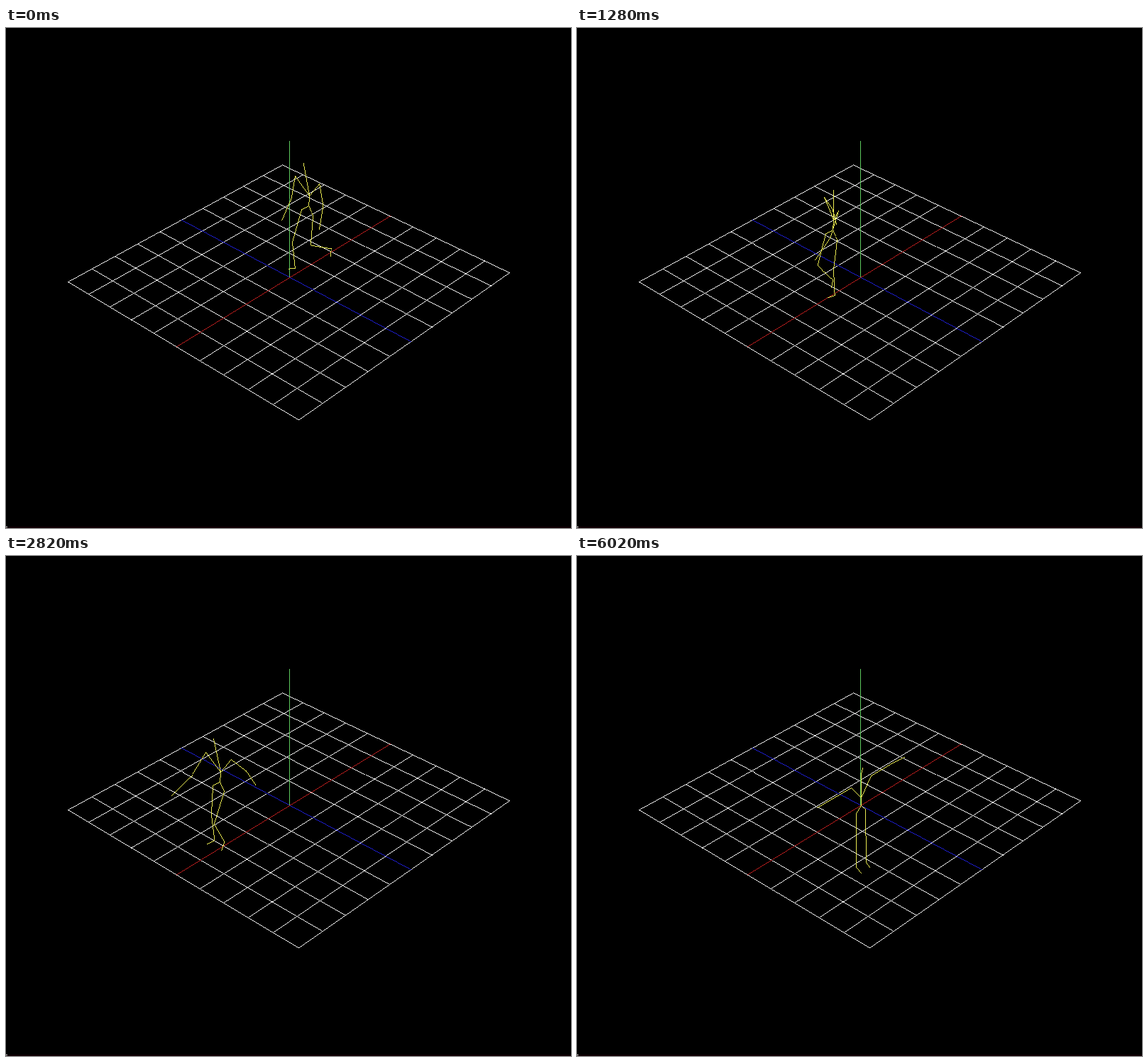
An HTML page with a canvas for the animation above (6.62 s loop, 796 by 704 pixels).

```html
<!DOCTYPE html>
<html lang="en">
<head>
<meta charset="utf-8">
<title>Walking skeleton</title>
<style>
html, body { margin: 0; width: 100%; height: 100%; overflow: hidden; background: #000; }
canvas { display: block; }
</style>
</head>
<body>
<canvas id="stage" width="796" height="704"></canvas>
<script>
const ctx = document.getElementById('stage').getContext('2d');
const LOOP = 6620, HOLD = 54, REST = 71, STRIDE = 46.5;
const RAD = Math.PI / 180;

// Hard-edged line, one pixel wide
function line([x0, y0], [x1, y1]) {
  const n = Math.max(1, Math.round(Math.max(Math.abs(x1 - x0), Math.abs(y1 - y0))));
  for (let i = 0; i <= n; i++) {
    ctx.fillRect(Math.round(x0 + (x1 - x0) * i / n), Math.round(y0 + (y1 - y0) * i / n), 1, 1);
  }
}

function path(color, ...points) {
  ctx.fillStyle = color;
  for (let i = 1; i < points.length; i++) line(points[i - 1], points[i]);
}

// Perspective view of the floor, a and b from -1 to 1
function floor(a, b) {
  const x = 149.85 * a + 161.15 * b, z = 149.85 * b - 161.15 * a;
  const w = 1 - 0.119 * z / 311;
  return [399.4 + x / w, 350.6 + 0.569 * z / w];
}

function drawScene() {
  ctx.fillStyle = '#000';
  ctx.fillRect(0, 0, 796, 704);
  ctx.fillStyle = '#100004';
  ctx.fillRect(0, 702, 796, 2);
  ctx.fillStyle = '#ececec';
  ctx.fillRect(0, 702, 2, 1);
  for (let i = -5; i <= 5; i++) {
    if (!i) continue;
    path('#ececec', floor(i / 5, -1), floor(i / 5, 1));
    path('#ececec', floor(-1, i / 5), floor(1, i / 5));
  }
  path('#b41c1c', floor(-1, 0), floor(1, 0));
  path('#1c1cc8', floor(0, -1), floor(0, 1));
  path('#5cc85c', [399, 159], [399, 350]);
}

const YELLOW = '#e8e850';

function drawWalker(step) {
  const phase = 360 * (step - 42) / STRIDE;
  const wave = (deg, shift, times = 1) => Math.cos((deg * times - shift) * RAD);
  const x = 428.5 - 2.36 * step, y = 248.5 + 1.36 * step + 4 * wave(phase, 0, 2);

  // Forward, sideways and up from the pelvis, to the screen
  const put = (f, s, u) => [x - f + s, y + 0.6 * f + 0.53 * s - u];
  const pelvis = put(0, 0, 0), neck = put(-1, 0, 13.4);
  path(YELLOW, put(4, -5 * wave(phase, 90), 61), neck, pelvis);

  // Bones given as [length, angle from straight down, sideways place]
  function limb(from, f, s, u, bones) {
    const points = [from, put(f, s, u)];
    for (const [length, angle, out] of bones) {
      f += length * Math.sin(angle * RAD);
      u -= length * Math.cos(angle * RAD);
      points.push(put(f, out, u));
    }
    path(YELLOW, ...points);
  }

  // Both sides move alike, half a stride apart.
  for (const side of [-1, 1]) {
    const p = phase + (side > 0 ? 180 : 0);
    const swing = wave(p, 105), snap = wave(p, -51, 3);
    limb(neck, 2 + 4 * wave(p, 80), 14 * side, 38, [
      [31, 28 * swing + 9 * snap, 17 * side],
      [28, 20 + 35 * swing + 12 * snap, 19 * side]
    ]);
    limb(pelvis, 2, 8 * side, -8, [
      [40, 12 + 19 * wave(p, -25), 8 * side],
      [38, -20 + 25 * wave(p, 25) + 9 * wave(p, 240, 2), 7 * side],
      [10, 60 + 55 * wave(p, 45), 7 * side]
    ]);
  }
}

function drawRest() {
  const neck = [400, 340], pelvis = [400, 351];
  path(YELLOW, [402, 298], [400, 306], neck, pelvis);
  path(YELLOW, [338, 354], [386, 326], neck, [414, 309], [446, 290], [461, 283]);
  path(YELLOW, [400, 446], [393, 438], [393, 362], pelvis, [406, 356], [407, 431], [412, 438]);
}

// Steps last 20, 20 and 100 ms in turn.
function stepAt(ms) {
  const t = ms + 20, r = t % 140;
  return 3 * Math.floor(t / 140) + (r < 20 ? 0 : r < 40 ? 1 : 2);
}

let shown = -1;
function tick(now) {
  const step = stepAt(now % LOOP);
  if (step !== shown) {
    shown = step;
    drawScene();
    if (step < REST) drawWalker(Math.min(step, HOLD));
    else drawRest();
  }
  requestAnimationFrame(tick);
}
tick(0);
</script>
</body>
</html>
```
